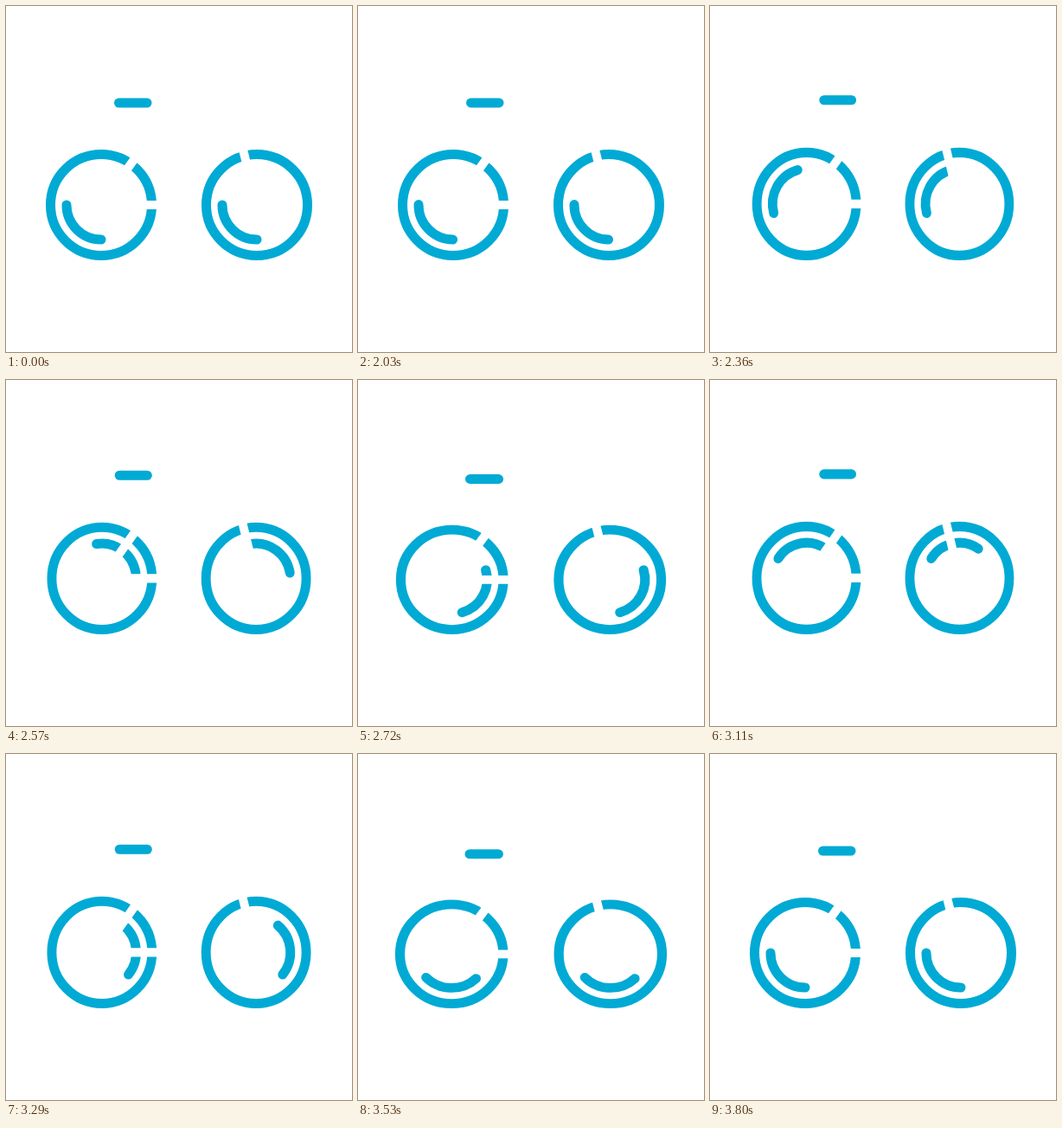
Recreate the animation shown at these times as an HTML page. Size 400x400 px, loop 3.89 s.

```html
<!DOCTYPE html>
<html lang="en">
<head>
<meta charset="utf-8">
<title>Bicycle</title>
<style>
  html, body { margin: 0; width: 100%; height: 100%; overflow: hidden; background: #fff; }
  svg { display: block; width: 100%; height: 100%; }
  .blue { fill: none; stroke: #00aad4; stroke-width: 11; stroke-linecap: round; }
  .frame { fill: none; stroke: #fff; stroke-width: 10; }
</style>
</head>
<body>
<svg viewBox="0 0 400 400">
  <defs>
    <circle id="rim" r="58.5"/>
    <path id="shine" d="M-40 0A40 40 0 0 0 0 40"/>
  </defs>
  <g id="bike">
    <g class="blue">
      <g transform="translate(110 230)"><use href="#rim"/><use class="spin" href="#shine"/></g>
      <g transform="translate(290 230)"><use href="#rim"/><use class="spin" href="#shine"/></g>
      <path d="M130.5 112H163"/>
    </g>
    <!-- the white frame shows only where it crosses the wheels -->
    <path class="frame" d="M160 161L110 230H200M265 130L290 230"/>
  </g>
</svg>
<script>
  const LOOP = 3890, START = 2000, STEP = 30, STEPS = 60;
  const TURNS = 2, GROUND = 294;
  // [progress, vertical stretch]
  const bounce = [[0, 0], [.25, .02], [.45, -.02], [.65, .02], [.85, -.02], [1, 0]];

  const bike = document.getElementById('bike');
  const spokes = document.querySelectorAll('.spin');
  const ease = p => p * p * (3 - 2 * p);

  function stretchAt(p) {
    const i = Math.max(1, bounce.findIndex(k => k[0] >= p));
    const [p0, v0] = bounce[i - 1], [p1, v1] = bounce[i];
    return v0 + (v1 - v0) * ease((p - p0) / (p1 - p0));
  }

  function draw(now) {
    const step = Math.floor((now % LOOP - START) / STEP);
    const p = Math.min(STEPS, Math.max(0, step)) / STEPS;
    const s = stretchAt(p);
    bike.setAttribute('transform',
      `translate(200 ${GROUND}) scale(${1 - s} ${1 + s}) translate(-200 ${-GROUND})`);
    for (const el of spokes) el.setAttribute('transform', `rotate(${ease(p) * 360 * TURNS})`);
  }

  function tick() {
    draw(performance.now());
    requestAnimationFrame(tick);
  }
  tick();
</script>
</body>
</html>
```
